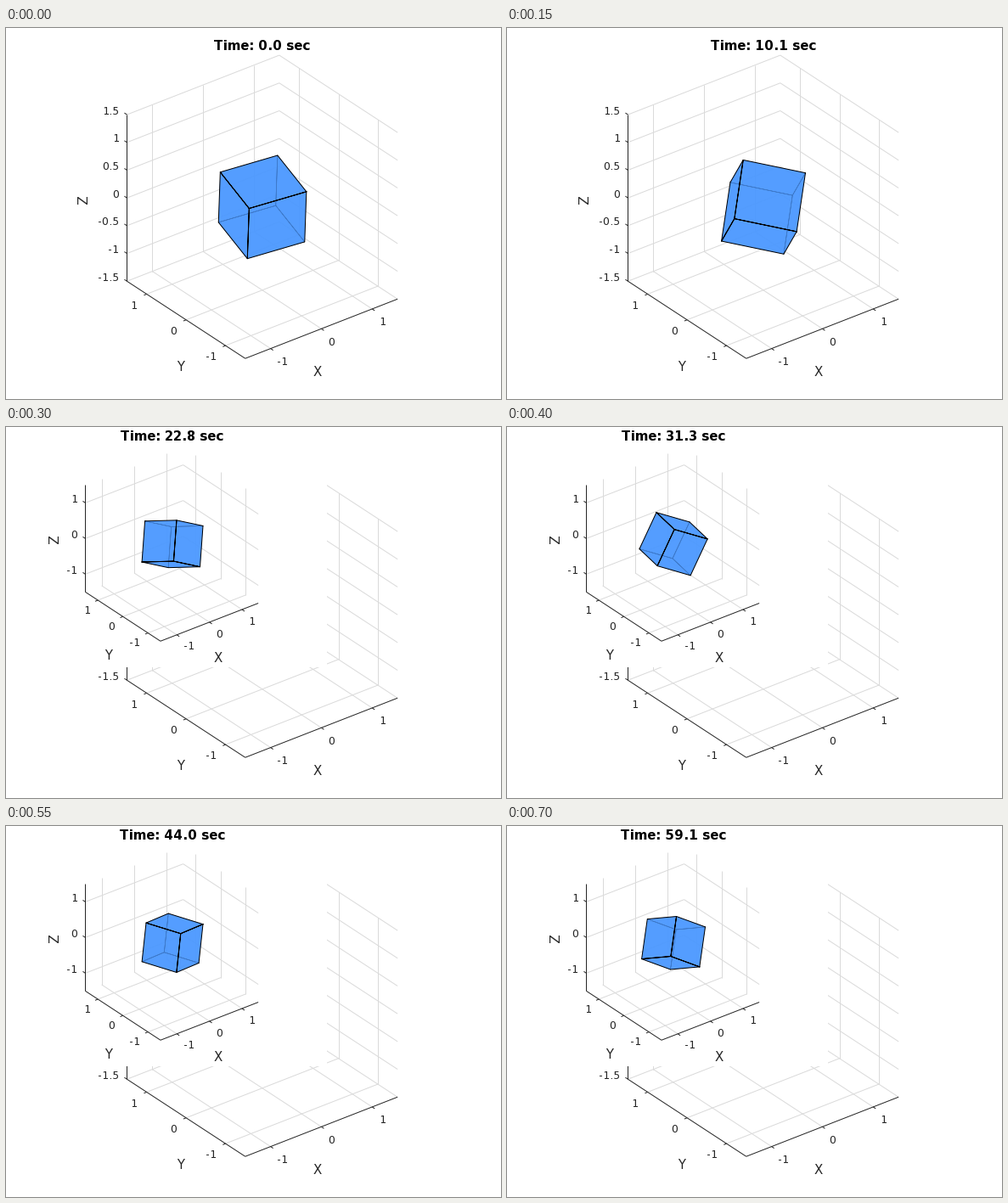
A matplotlib script for the animation above (0.75 s loop, 583 by 437 pixels).

```python
import matplotlib.pyplot as plt
import numpy as np
from matplotlib.animation import FuncAnimation
from matplotlib.patches import Polygon, Rectangle

W, H, DPI = 583, 437, 64
PT = 72 / DPI
FRAMES, STEP = 15, 50
SWITCH = 4  # first frame with the small axes
LIM, TICKS = 1.5, (-1, 0, 1)
GRID, INK, BLUE = "#dadada", "#262626", (0.3, 0.6, 1.0)

plt.rcParams.update({"font.family": "DejaVu Sans", "text.hinting_factor": 1})
fig = plt.figure(figsize=(W / DPI, H / DPI), dpi=DPI, facecolor="white")
ax = fig.add_axes([0, 0, 1, 1])
ax.set_xlim(-0.25, W - 0.25)
ax.set_ylim(H - 0.25, -0.25)
ax.axis("off")


class Scene:
    """Screen layout of a 3D plot box with limits -LIM to LIM."""

    def __init__(self, corner, ux, uy, uz, zticks, center, scale, title):
        self.corner = np.array(corner, float)
        self.units = np.array([ux, uy, (0, -uz)], float)
        self.zticks = zticks
        self.center = np.array(center, float)
        self.scale = scale
        self.title = title

    def at(self, x, y, z):
        return self.corner + (np.array([x, y, z]) + LIM) @ self.units


BIG = Scene((281.5, 389), (59.8, -23.33), (-46.43, -30.33), 65.4,
            np.arange(-LIM, LIM + 0.1, 0.5), (301.8, 210.6), 75.6, (301.5, 26))
SMALL = Scene((181.7, 252), (38.4, -14.9), (-29.5, -19.3), 42.0,
              TICKS, (195.8, 137.5), 48.7, (195.5, 16))


def draw_box(sc, z, shown, xoff, yoff, names):
    arts = []

    def add(p, q, color=GRID):
        arts.extend(ax.plot(*zip(p, q), color=color, lw=PT, visible=shown,
                            zorder=z + (color == INK), solid_capstyle="butt"))

    def text(x, y, s, size=13.3, **kw):
        # capitals are centred on y
        arts.append(ax.text(x, y + 0.365 * size, s, fontsize=size * PT,
                            color=INK, zorder=z + 1, visible=shown, **kw))

    for t in TICKS:
        add(sc.at(t, -LIM, -LIM), sc.at(t, LIM, -LIM))
        add(sc.at(t, LIM, -LIM), sc.at(t, LIM, LIM))
        add(sc.at(-LIM, t, -LIM), sc.at(LIM, t, -LIM))
        add(sc.at(LIM, t, -LIM), sc.at(LIM, t, LIM))
    for t in sc.zticks:
        add(sc.at(-LIM, LIM, t), sc.at(LIM, LIM, t))
        add(sc.at(LIM, LIM, t), sc.at(LIM, -LIM, t))

    left = sc.at(-LIM, LIM, -LIM)
    add(sc.corner, sc.at(LIM, -LIM, -LIM), INK)
    add(sc.corner, left, INK)
    add(left, sc.at(-LIM, LIM, LIM), INK)

    for t in TICKS:
        p = sc.at(t, -LIM, -LIM)
        add(p, p + (3, 2), INK)
        text(*(p + xoff), f"{t}", ha="left")
        p = sc.at(-LIM, t, -LIM)
        add(p, p + (-3.2, 1.3), INK)
        text(*(p + yoff), f"{t}", ha="right")
    for t in sc.zticks:
        p = sc.at(-LIM, LIM, t)
        add(p, p + (-3, -2), INK)
        text(*(p + (-9.5, -5.4)), f"{t:g}", ha="right")

    for name, (x, y) in zip("XY", names):
        text(x, y, name, size=14.6, ha="center")
    arts.append(ax.text(*names[2], "Z", fontsize=14.6 * PT, color=INK,
                        rotation=90, ha="center", va="center", zorder=z + 1,
                        visible=shown))
    return arts


draw_box(BIG, 1, True, (7.7, 14.6), (-11, 12.5),
         [(366, 404), (205, 398), (91, 201)])
inset = draw_box(SMALL, 5, False, (7.7, 12.8), (-9, 11),
                 [(249.5, 271), (120.5, 268), (57, 131)])
inset.append(ax.add_patch(Rectangle((51, 0), 327, 283, color="white", lw=0,
                                    zorder=4, visible=False)))
title = ax.text(0, 0, "", fontsize=15 * PT, weight="bold", color="black",
                ha="center", va="baseline", zorder=9)

# Key poses of the tumbling cube, in degrees as seen by the viewer.
KEYS = [0, 3, 4, 8, 10, 12, 14]
CLOCK = [0, 10.1, 14.3, 31.3, 38.2, 49.7, 59.1]
ROLL = [-2, -8.5, 16.7, -25, -25.4, 13.2, -8.1]
TILT = [38.5, -22.3, -26.6, 13.2, 46.1, -7.6, -12.9]
SPIN = [28, 8.5, -25, -55.5, -104, -137.5, -136.5]


def turn(axis, degrees):
    """Rotation matrix about coordinate axis 0, 1 or 2."""
    c, s = np.cos(np.radians(degrees)), np.sin(np.radians(degrees))
    i, j = (axis + 1) % 3, (axis + 2) % 3
    m = np.eye(3)
    m[i, i] = m[j, j] = c
    m[i, j], m[j, i] = -s, s
    return m


def rotation(frame):
    roll, tilt, spin = (np.interp(frame, KEYS, v) for v in (ROLL, TILT, SPIN))
    return turn(2, roll) @ turn(0, tilt) @ turn(1, spin)


def fill(z):
    return ax.add_patch(Polygon(np.zeros((6, 2)), fc=BLUE, alpha=0.8, lw=0,
                                zorder=z))


def edge(z, width):
    return ax.plot([], [], color="black", lw=width * PT, zorder=z)[0]


back, front = fill(10), fill(12)
hidden, near_edges, outline = edge(11, 0.7), edge(13, 1), edge(13, 1)


def star(p, arms):
    """One path through p and the end of each arm."""
    return np.array([q for arm in arms for q in (p, p + arm)] + [p]).T


def update(frame):
    small = frame >= SWITCH
    sc = SMALL if small else BIG
    for art in inset:
        art.set_visible(small)
    title.set_position(sc.title)
    title.set_text(f"Time: {np.interp(frame, KEYS, CLOCK):.1f} sec")

    r = rotation(frame)
    r = r * np.where(r[2] > 0, -1, 1)  # edges point away from the viewer
    a, b, c = arms = (r[:2] * [[sc.scale], [-sc.scale]]).T
    half = arms.sum(axis=0) / 2
    near, far = sc.center - half, sc.center + half
    hexagon = near + np.array([a, a + b, b, b + c, c, c + a])
    back.set_xy(hexagon)
    front.set_xy(hexagon)
    hidden.set_data(*star(far, -arms))
    near_edges.set_data(*star(near, arms))
    outline.set_data(*np.vstack([hexagon, hexagon[:1]]).T)
    return [title, back, front, hidden, near_edges, outline, *inset]


anim = FuncAnimation(fig, update, frames=FRAMES, interval=STEP,
                     repeat=True, repeat_delay=0, blit=False)
plt.show()
```
